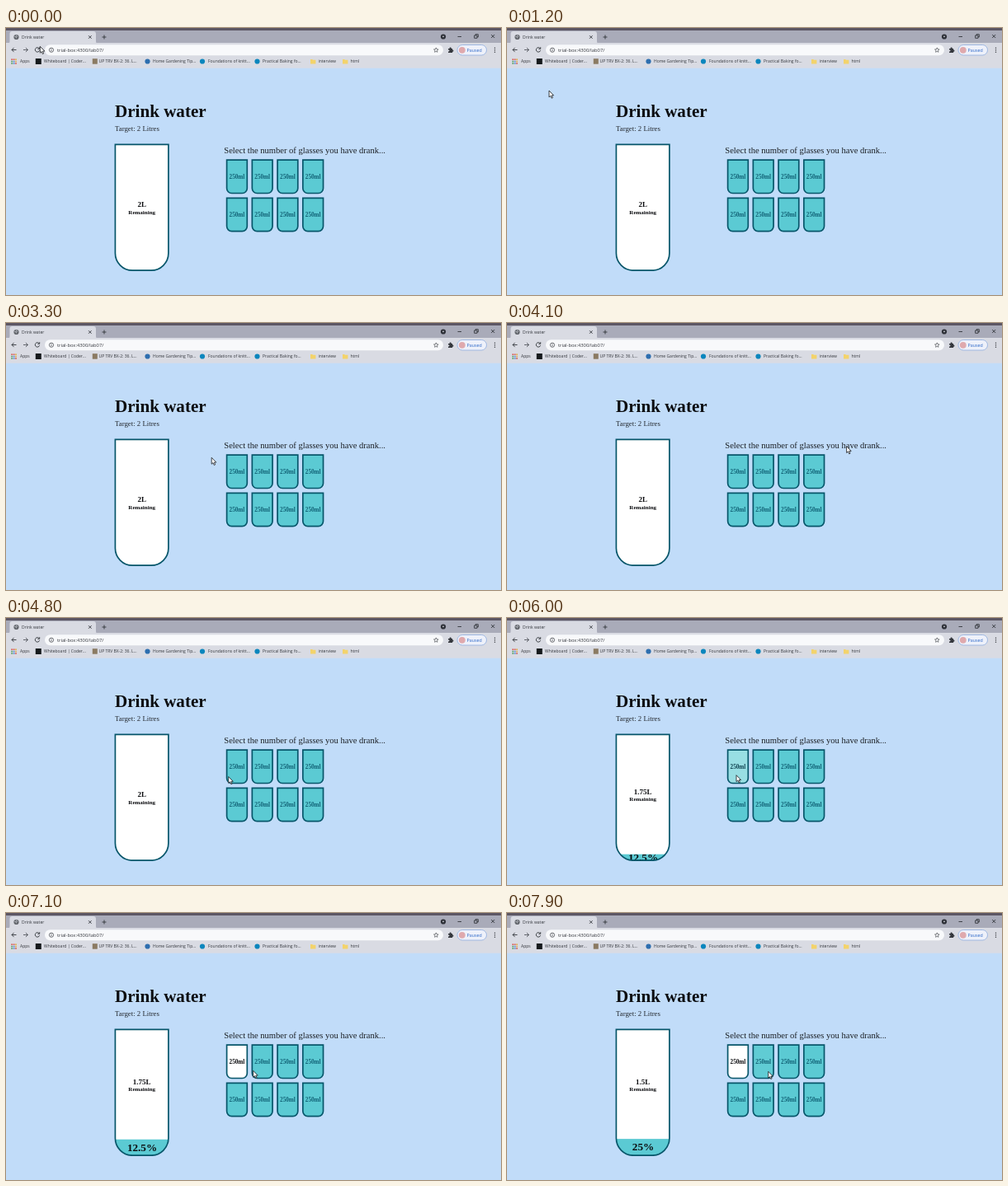
These frames come from a looping animation (600 by 324 pixels, 8 s). An HTML page:

```html
<!DOCTYPE html>
<html lang="en">
<head>
<meta charset="utf-8">
<title>Drink water</title>
<style>
  html, body { margin: 0; width: 100%; height: 100%; overflow: hidden; background: #c1dcf9; }
  svg { display: block; width: 100%; height: 100%; }
  text { white-space: pre; }
  .ui { font-family: "Open Sans", "Noto Sans", sans-serif; font-size: 5px; fill: #34373d; }
  .page { font-family: "Liberation Serif", "Times New Roman", serif; fill: #0c0d10; }
  .bold { font-weight: 700; }
  .mid { text-anchor: middle; }
  .line { fill: none; stroke: #33363b; stroke-width: .9; }
  .edge { stroke: #07566a; stroke-width: 1.7; }
</style>
</head>
<body>
<svg id="stage" viewBox="0 0 600 324">
  <defs>
    <clipPath id="inside"><path id="clipShape"/></clipPath>
  </defs>

  <!-- tab strip -->
  <rect width="600" height="19" fill="#a9abb9"/>
  <rect width="600" height="3" fill="#5c5663"/>
  <path d="M2 19Q4.500 19 4.500 16V7Q4.500 4 7.500 4H106Q109 4 109 7V16Q109 19 111.500 19Z" fill="#d9dbe3"/>
  <circle cx="12.500" cy="11" r="3.100" fill="#62666c"/>
  <path d="M10.300 10.300l2 .6 .3 1.500M12.800 8.600l-.3 1.200 1.700 .5" fill="none" stroke="#d9dbe3" stroke-width=".7"/>
  <text class="ui" x="19" y="13">Drink water</text>
  <path class="line" d="M100 9.200l3.600 3.600m0-3.600l-3.600 3.600M116.500 11h5m-2.500-2.500v5"/>
  <circle cx="530" cy="10.500" r="3.100" fill="#2c2f36"/>
  <path d="M528.700 9.700h2.600l-1.300 1.700z" fill="#d9dbe3"/>
  <path class="line" d="M547.500 10.500h4.500M567.700 9h3.300v3.300h-3.300zM569 9v-1.300h3.300V11H571M588.200 8l4 4m0-4l-4 4"/>

  <!-- toolbar -->
  <rect y="18" width="600" height="31" fill="#d9dbe3"/>
  <path class="line" d="M12.500 26.500H7m2.600-2.600L7 26.500l2.600 2.600"/>
  <path class="line" d="M21 26.500h5.500m-2.600-2.600l2.600 2.600-2.600 2.600" style="stroke:#55585f"/>
  <path class="line" d="M40.100 24.700A2.700 2.700 0 1 0 40.600 27.200M40.700 23.200v2.200h-2.200"/>
  <rect x="47" y="20.200" width="483" height="13" rx="6.500" fill="#f8f9fb"/>
  <circle class="line" cx="55" cy="26.700" r="2.600" style="stroke-width:.7"/>
  <path class="line" d="M55 26.300v1.700M55 25v.6" style="stroke-width:.7"/>
  <text class="ui" x="62" y="28.800" style="font-size:5.800px">trial-box:4300/lab07/</text>
  <path class="line" d="M521.300 23.900l.8 1.900 2 .2-1.500 1.300.4 2-1.700-1-1.700 1 .4-2-1.500-1.300 2-.2z" style="stroke-width:.6"/>
  <path d="M536 25h1.600a1.100 1.100 0 1 1 2.100 0h1.400v1.700a1 1 0 1 1 0 1.900v1.500h-5.100v-1.700a1 1 0 1 0 0-1.800z" fill="#34373d"/>
  <rect x="547" y="20.500" width="35.500" height="12.500" rx="6.250" fill="#eef1fa" stroke="#8facdf" stroke-width=".8"/>
  <circle cx="552.800" cy="26.800" r="3.900" fill="#dfa9ad"/>
  <text class="ui" x="558.500" y="28.600" style="font-size:5.300px;fill:#2a66c8">Paused</text>
  <g fill="#3f4248"><circle cx="592.500" cy="24.300" r=".75"/><circle cx="592.500" cy="26.800" r=".75"/><circle cx="592.500" cy="29.300" r=".75"/></g>

  <!-- bookmarks -->
  <g id="apps"></g>
  <rect x="35.800" y="37" width="7" height="7" fill="#15191c"/>
  <rect x="104.800" y="37.200" width="6" height="6.500" fill="#8b7a62"/>
  <circle cx="171.500" cy="40.500" r="3.100" fill="#2d6eaf"/>
  <circle cx="238" cy="40.500" r="3.100" fill="#0b86bd"/>
  <circle cx="304.500" cy="40.500" r="3.100" fill="#0b86bd"/>
  <g id="marks"></g>

  <!-- page -->
  <rect y="48.700" width="600" height="276" fill="#c1dcf9"/>
  <text class="page bold" x="132" y="108" font-size="21.080">Drink water</text>
  <text class="page" x="132" y="125.200" font-size="8.800" style="fill:#24282e">Target: 2 Litres</text>
  <text class="page" x="264.300" y="152.300" font-size="10.560" style="fill:#1c2025">Select the number of glasses you have drank...</text>

  <path id="bigFill" fill="#fff"/>
  <g clip-path="url(#inside)">
    <rect id="water" x="131" width="68" fill="#5bcad3"/>
    <text id="percent" class="page bold mid" x="165" font-size="13.180"></text>
  </g>
  <text id="litres" class="page bold mid" x="164.700" font-size="9"></text>
  <text id="remain" class="page bold mid" x="164.700" font-size="7.030">Remaining</text>
  <path id="bigEdge" class="edge" fill="none"/>
  <g id="glasses"></g>

  <path id="cursor" d="M0 0V7.900L1.800 6.300L3.100 9.200L4.400 8.600L3.200 5.800H5.600Z" fill="#fff" stroke="#16181c" stroke-width=".8" stroke-linejoin="round"/>
</svg>
<script>
const LOOP = 8000, STEP = 100, FADE = 300;
const TOP = 142, BOTTOM = 293.7;
const TEAL = [91, 202, 211], WHITE = [255, 255, 255];
const INK = [18, 98, 118], BLACK = [12, 13, 16];

// time, tip x, tip y
const PATH = [
  [0, 41.3, 22.3], [300, 43, 25], [600, 44, 29], [900, 42, 28], [1000, 43, 34],
  [1200, 51, 76], [1400, 57, 113], [1500, 57, 113], [1700, 98, 172],
  [1900, 131, 216], [2000, 131, 216], [2200, 182, 217.3], [2300, 196, 216.5],
  [2400, 188, 216], [2500, 188, 216], [2900, 208, 190], [3300, 249.2, 163.3],
  [3400, 277, 158], [3600, 302, 148], [3700, 302, 148], [4200, 439, 150],
  [4600, 391, 167], [4700, 330, 180], [4800, 269.7, 192.5], [5000, 259, 192],
  [5100, 259, 192], [5500, 282, 191], [5700, 278, 190.7], [6700, 278, 190.7],
  [7000, 294, 191], [7400, 316.7, 192.3], [8000, 316.7, 192.3]
];

const $ = id => document.getElementById(id);
const mix = (a, b, k) => a + (b - a) * k;
const blend = (a, b, k) => `rgb(${a.map((v, i) => Math.round(mix(v, b[i], k)))})`;

function add(parent, tag, attrs, content = "") {
  const el = document.createElementNS("http://www.w3.org/2000/svg", tag);
  for (const key in attrs) el.setAttribute(key, attrs[key]);
  el.textContent = content;
  parent.appendChild(el);
  return el;
}

function cup(x, y, w, h, r) {
  return `M${x} ${y}h${w}v${h - r}a${r} ${r} 0 0 1 ${-r} ${r}h${2 * r - w}a${r} ${r} 0 0 1 ${-r} ${-r}z`;
}

// CSS "ease" curve
function ease(x) {
  if (x <= 0) return 0;
  if (x >= 1) return 1;
  const bez = (a, b, u) => 3 * a * u * (1 - u) ** 2 + 3 * b * u * u * (1 - u) + u ** 3;
  let lo = 0, hi = 1;
  for (let i = 0; i < 24; i++) {
    const u = (lo + hi) / 2;
    if (bez(.25, .25, u) < x) lo = u; else hi = u;
  }
  return bez(.1, 1, lo);
}

function pointAt(t) {
  const i = Math.max(1, PATH.findIndex(p => p[0] >= t));
  const a = PATH[i - 1], b = PATH[i];
  const k = (t - a[0]) / (b[0] - a[0]);
  return [mix(a[1], b[1], k), mix(a[2], b[2], k)];
}

["#d9534a", "#d9534a", "#e2a93b", "#4b9b58", "#4a7fd0", "#e2a93b", "#4b9b58", "#4a7fd0", "#d9534a"]
  .forEach((fill, i) => add($("apps"), "rect", {
    x: 6.4 + i % 3 * 2.4, y: 37.4 + Math.floor(i / 3) * 2.4, width: 1.6, height: 1.6, fill
  }));

[[17, "Apps"], [46, "Whiteboard | Coder..."], [112.5, "UP TRV BX-2: 36. L..."],
 [178, "Home Gardening Tip..."], [245, "Foundations of knitt..."],
 [311, "Practical Baking fo..."], [378.5, "interview"], [417.5, "html"]]
  .forEach(([x, label]) => add($("marks"), "text", { class: "ui", x, y: 42.3 }, label));

[369, 408].forEach(x => add($("marks"), "path", {
  d: `M${x} 38h2.300l.8 .8h3.300v4.600h-6.400z`, fill: "#f3d36b"
}));

const big = cup(132.4, 141.3, 64.5, 152.9, 21);
["clipShape", "bigFill", "bigEdge"].forEach(id => $(id).setAttribute("d", big));

const glasses = Array.from({ length: 8 }, (_, i) => {
  const x = 267.6 + i % 4 * 30.74, y = 160.2 + Math.floor(i / 4) * 46.12;
  return {
    body: add($("glasses"), "path", { class: "edge", d: cup(x, y, 24.7, 40.3, 6) }),
    label: add($("glasses"), "text", { class: "page bold mid", x: x + 12.35, y: y + 22.5, "font-size": 7.2 }, "250ml")
  };
});

function draw(t) {
  const one = ease((t - 5930) / FADE), two = ease((t - 7885) / FADE);
  const count = (t >= 5900) + (t >= 7900);
  const level = (one + two) / 8 * (BOTTOM - TOP);
  const surface = BOTTOM - level;

  $("water").setAttribute("y", surface);
  $("water").setAttribute("height", level + 2);
  $("percent").textContent = ["", "12.5%", "25%"][count];
  $("percent").setAttribute("y", BOTTOM - level / 2 + 4.5);
  $("litres").textContent = ["2L", "1.75L", "1.5L"][count];
  $("litres").setAttribute("y", 217.3 - level / 2);
  $("remain").setAttribute("y", 225.5 - level / 2);

  glasses.forEach(({ body, label }, i) => {
    const k = [one, two][i] || 0;
    body.style.fill = blend(TEAL, WHITE, k);
    label.style.fill = blend(INK, BLACK, k);
  });

  const [x, y] = pointAt(t);
  $("cursor").setAttribute("transform", `translate(${x} ${y})`);
}

const start = performance.now();
function tick() {
  const t = (performance.now() - start) % LOOP;
  draw(Math.floor(t / STEP) * STEP);
  requestAnimationFrame(tick);
}
tick();
</script>
</body>
</html>
```
